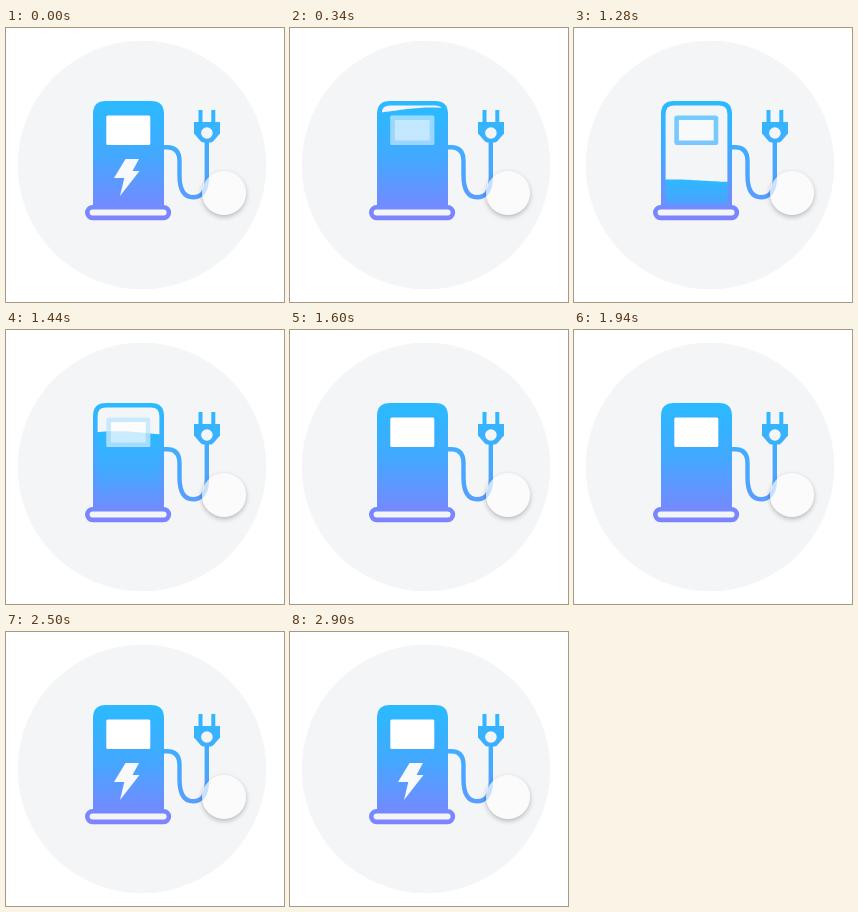
An HTML page for the animation above (2920 ms loop, 278 px wide and 274 px high).

```html
<!DOCTYPE html>
<html lang="en">
<head>
<meta charset="utf-8">
<title>Charging station</title>
<style>
  html, body { margin: 0; width: 100%; height: 100%; overflow: hidden; background: #fff; }
  svg { position: absolute; left: 0; top: 0; }
  .line { fill: none; stroke: url(#blue); stroke-width: 4.6; }
  .knob {
    position: absolute; left: 195.5px; top: 143px; width: 44px; height: 44px;
    border-radius: 50%; background: rgba(255, 255, 255, .68);
    box-shadow: 0 2px 5px rgba(0, 0, 0, .26);
  }
</style>
</head>
<body>
<svg width="278" height="274" viewBox="0 0 278 274">
  <defs>
    <linearGradient id="blue" gradientUnits="userSpaceOnUse" x1="0" y1="73" x2="0" y2="192">
      <stop offset="0" stop-color="#2abaff"/>
      <stop offset=".45" stop-color="#42a9ff"/>
      <stop offset="1" stop-color="#8082ff"/>
    </linearGradient>
    <linearGradient id="fuel" gradientUnits="userSpaceOnUse" x1="0" y1="73" x2="0" y2="192">
      <stop offset="0" stop-color="#2abaff"/>
      <stop offset=".45" stop-color="#42a9ff"/>
      <stop offset="1" stop-color="#8082ff"/>
    </linearGradient>
    <linearGradient id="plugBlue" gradientUnits="userSpaceOnUse" x1="0" y1="82" x2="0" y2="172">
      <stop offset="0" stop-color="#2fb8ff"/>
      <stop offset="1" stop-color="#589dff"/>
    </linearGradient>
    <clipPath id="tank"><path d="M88 179V85Q88 74 99 74H146Q157 74 157 85V179Z"/></clipPath>
  </defs>

  <circle cx="136" cy="137" r="124.3" fill="#f3f5f7"/>

  <g fill="none" stroke="url(#plugBlue)" stroke-width="4.4">
    <path d="M157 119.2H161C170 119.2 173.5 125 173.5 133V147C173.5 161 178 169.3 187 169.3C196 169.3 200.8 162 200.8 150V112"/>
    <path d="M194.5 82V95M207.3 82V95" stroke-width="4"/>
  </g>
  <path d="M188 94H214V105.5L207.5 113Q206 114.6 204 114.6H198Q196 114.6 194.5 113L188 105.5Z" fill="url(#plugBlue)"/>
  <circle cx="200.9" cy="105" r="5.8" fill="#f3f5f7"/>

  <path id="fill" fill="url(#fuel)" clip-path="url(#tank)"/>
  <path class="line" d="M89.3 179V86Q89.3 75.3 100 75.3H145Q155.7 75.3 155.7 86V179"/>
  <rect class="line" x="81.3" y="179.3" width="81.6" height="10.6" rx="5.3" style="fill:#f3f5f7"/>

  <rect id="pane" x="100.3" y="87.5" width="44" height="29.6" rx="1.5" fill="#fff"/>
  <rect id="frame" class="line" x="102.6" y="89.8" width="39.4" height="25" rx=".5"/>
  <path id="bolt" d="M119.5 131H133L126.5 143H133.5L114 168L118.3 150H108Z" fill="#f7f9fb"/>
</svg>
<div class="knob"></div>

<script>
const LOOP = 2920, EMPTY = 182, FULL = 66;
const $ = id => document.getElementById(id);
const fill = $('fill'), fuel = $('fuel'), pane = $('pane'), frame = $('frame'), bolt = $('bolt');

const ramp = (t, from, to) => Math.min(1, Math.max(0, (t - from) / (to - from)));
const ease = p => (1 - Math.cos(Math.PI * p)) / 2;

// Each part leaves during the first span and returns during the second.
const presence = (t, out0, out1, in0, in1) =>
  t < 900 ? 1 - ramp(t, out0, out1) : ramp(t, in0, in1);

function surface(level, height, t) {
  const crest = 95 + (t - 1280) * .1;
  let d = 'M84 184';
  for (let x = 84; x <= 162; x += 3) {
    const y = level - height * Math.cos((x - crest) * 2 * Math.PI / 140);
    d += `L${x} ${y.toFixed(2)}`;
  }
  return d + 'L162 184Z';
}

function draw(t) {
  const p = presence(t, 200, 773, 1089, 1662);
  const level = EMPTY + (FULL - EMPTY) * ease(p);
  fill.setAttribute('d', surface(level, 4 * p, t));
  fill.style.display = p > 0 ? '' : 'none';
  fuel.setAttribute('y1', Math.max(73, level - 3));

  const white = presence(t, 260, 530, 1150, 1540);
  pane.style.opacity = white;
  frame.style.opacity = 1 - white;

  const b = ease(presence(t, 100, 300, 2020, 2340));
  bolt.style.opacity = b;
  bolt.setAttribute('transform', `translate(121 149.5) scale(${.5 + .5 * b}) translate(-121 -149.5)`);
}

const start = performance.now();
function tick() {
  draw((performance.now() - start) % LOOP);
  requestAnimationFrame(tick);
}
tick();
</script>
</body>
</html>
```
